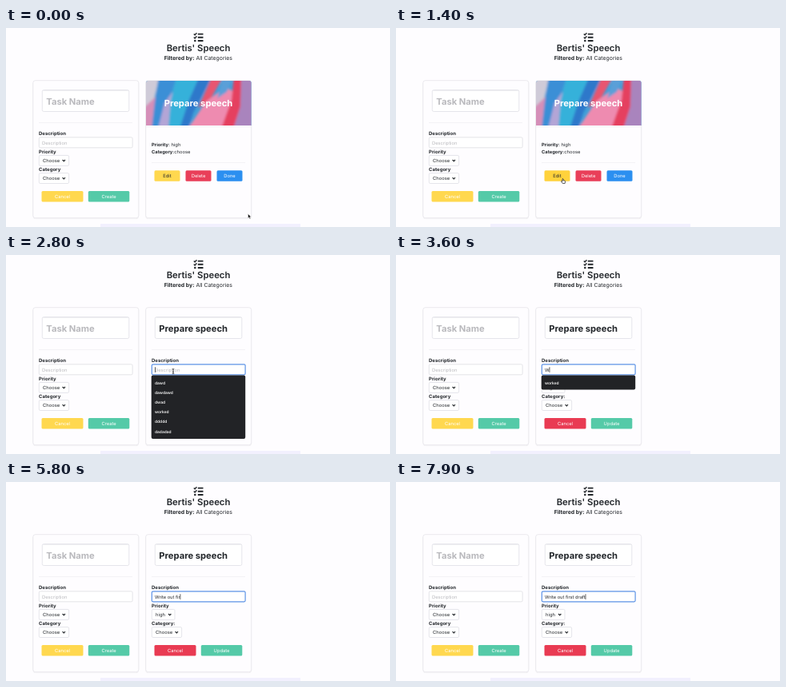
Recreate the animation shown at these times as an HTML page. Size 480 by 249 pixels, loop 8000 ms.

```html
<!DOCTYPE html>
<html lang="en">
<head>
<meta charset="utf-8">
<title>Task board</title>
<style>
  html, body { margin: 0; width: 100%; height: 100%; overflow: hidden; background: #fefdff; }
  svg { display: block; width: 100vw; height: 100vh; }
  text { font: 5.8px Inter, "Liberation Sans", sans-serif; fill: #23272b; white-space: pre; text-rendering: geometricPrecision; }
  .bold { font-weight: 700; }
  .label { font-size: 6px; font-weight: 700; }
  .big { font-size: 11.2px; font-weight: 700; }
  .mid { text-anchor: middle; }
  .white { fill: #fff; }
  .hint { fill: #b9b9bd; }
  .item { font-size: 4.9px; font-weight: 600; fill: #f4f4f4; }
</style>
</head>
<body>
<svg id="stage" viewBox="0 0 480 249">
  <defs>
    <filter id="soft" x="-20%" y="-20%" width="140%" height="140%"><feGaussianBlur stdDeviation="1.5"/></filter>
    <filter id="shade" x="-10%" y="-10%" width="120%" height="120%">
      <feDropShadow dx="0" dy=".6" stdDeviation=".7" flood-color="#000" flood-opacity=".1"/>
    </filter>
    <clipPath id="banner"><path d="M175 122V68.500q0-2.500 2.500-2.500H304q2.500 0 2.500 2.500V122z"/></clipPath>
  </defs>
  <rect width="480" height="249" fill="#fefdff"/>
  <rect x="118" y="245" width="250" height="4" fill="#f2f0fe"/>
  <g stroke="#23272b" fill="none" transform="translate(0 .3)">
    <path d="M239.800 7.300h6.700M239.800 11.500h6.700M239.800 15.700h6.700" stroke-width="1.900"/>
    <path d="M234.800 7.200l1.300 1.300 2.300-2.600M234.800 11.300l1.300 1.300 2.300-2.600" stroke-width="1.400"/>
    <circle cx="236.300" cy="15.700" r="1.300" fill="#23272b" stroke="none"/>
  </g>
  <text class="mid" x="240.500" y="29" style="font-size:11.300px;font-weight:600">Bertis' Speech</text>
  <text class="mid" x="240.300" y="40" style="font-size:6.900px"><tspan class="bold">Filtered by:</tspan> All Categories</text>
  <g id="cards"></g>
  <g id="create"></g>
  <g id="view"></g>
  <g id="edit"></g>
  <g id="menu"></g>
  <g id="arrow"><path d="M0 0v5.600l1.300-1.200 1 2.100.9-.4-1-2h1.800z" fill="#111" stroke="#fff" stroke-width=".5"/></g>
  <g id="hand"><path d="M-.6-2.200q.6-.7 1.100.2v1.700l2 .5q.7.300.5 1.200l-.4 2h-2.900l-1.700-2.200q-.1-.9.900-.5l.5.4z" fill="#fff" stroke="#111" stroke-width=".7"/></g>
  <g id="beam"><path d="M-1.300-3q1.300 0 1.300.8q0-.8 1.300-.8M0-2.300v4.800M-1.300 3.200q1.300 0 1.300-.8q0 .8 1.300.8M-.8.900h1.600" fill="none" stroke="#222" stroke-width=".7"/></g>
</svg>
<script>
const $ = id => document.getElementById(id);
const LOOP = 8000, STEP = 100;

const rect = (x, y, w, h, fill, stroke = "none", r = 1.5, extra = "") =>
  `<rect x="${x}" y="${y}" width="${w}" height="${h}" rx="${r}" fill="${fill}" stroke="${stroke}" stroke-width=".7" ${extra}/>`;
const text = (x, y, s, cls = "", id = "") =>
  `<text x="${x}" y="${y}" class="${cls}" ${id && `id="${id}"`}>${s}</text>`;
const button = (x, y, w, s, fill, cls = "white", id = "") =>
  rect(x, y, w, 13.5, fill, "none", 1.5, id && `id="${id}"`) + text(x + w / 2, y + 8.9, s, "mid " + cls);
const rule = (x, y) => `<path d="M${x} ${y}h117" stroke="#efeef2" stroke-width=".7"/>`;
const select = (x, y, w, s, id = "") =>
  rect(x, y, w, 13, "#fff", "#dcdce2", 1.5, id && `id="${id}"`) + text(x + 4.800, y + 8.700, s) +
  `<path d="M${x + w - 8} ${y + 5.6}l1.700 1.700 1.700-1.700" fill="none" stroke="#23272b" stroke-width="1.200"/>`;

// Form contents shared by both cards; x is the left edge of the fields.
const form = (x, title, titleClass, pick, pickWidth, catLabel, left, right, field, pickId) =>
  rect(x + 4.3, 77.5, 108.5, 27, "#fff", "#dcdce2", 2) +
  `<path d="M${x + 5} 78.500h107" stroke="#efeff2" stroke-width="1"/>` +
  text(x + 9.300, 95.800, title, "big " + titleClass) + rule(x, 118.500) +
  text(x, 134.400, "Description", "label") +
  rect(x + .3, 136.800, 116.800, 13, "#fff", "#d8d8de", 1.5, field && `id="${field}"`) +
  text(x + 4, 145.500, "Description", "hint", field && "hint") +
  text(x, 157, "Priority", "label") + select(x + .3, 159.400, pickWidth, pick, pickId) +
  text(x, 179.300, catLabel, "label") + select(x + .3, 181.500, 37.300, "Choose") +
  button(x + 3.500, 204, 52, "Cancel", left) + button(x + 61.800, 204, 51.500, right, "#55caa8");

const paint = (d, fill) => `<path d="${d}" fill="${fill}"/>`;
const picture = `<g clip-path="url(#banner)"><rect x="175" y="66" width="132" height="56" fill="#3f9fd8"/><g filter="url(#soft)">` +
  paint("M170 60h22l-7 30-15 14z", "#cfcbd8") +
  paint("M170 102l17-16 7 42h-24z", "#d58fb8") +
  paint("M191 60h22l-11 36-12 30h-8l4-34z", "#3a8fd6") +
  paint("M198 94l10-14-2 46h-16z", "#b3a5d6") +
  paint("M214 60h32l-16 36-12 30h-15l3-36z", "#35b1da") +
  paint("M242 60h16l-24 46-6 20h-11l11-34z", "#2f78ca") +
  paint("M258 60h14l-18 32-14 8z", "#e8556f") +
  paint("M250 92l24-18 12 6-14 48h-46z", "#ee8bb0") +
  paint("M272 60h13l-9 20-12 8z", "#5a9fd8") +
  paint("M285 60h10l-2 46-8 20h-16l13-36z", "#e5405e") +
  paint("M294 60h18v66h-28l9-28z", "#a984bd") + `</g></g>`;

$("cards").innerHTML = [33.8, 174.700].map(x => rect(x, 65.700, 132, 172, "#fefdff", "#e4e3e9", 3, 'filter="url(#shade)"')).join("");
$("create").innerHTML = form(41, "Task Name", "hint", "Choose", 37.300, "Category", "#ffd84f", "Create", "", "");
$("view").innerHTML = picture + text(240.500, 98, "Prepare speech", "big mid white") +
  `<path d="M175 123.500h131.500" stroke="#eeedf1" stroke-width=".7"/>` +
  text(182, 148.400, '<tspan class="bold">Priority:</tspan> high') +
  text(182, 157.300, '<tspan class="bold">Category:</tspan>choose') + rule(182, 168.500) +
  button(185.500, 178.300, 32, "Edit", "#ffd84f", "", "editButton") +
  button(224.500, 178.300, 32, "Delete", "#e93f59") + button(263.500, 178.300, 32, "Done", "#2b8ff0");
$("edit").innerHTML = form(182, "Prepare speech", "", "high", 28.700, "Category:", "#e93b53", "Update", "field", "pick") +
  text(186, 145.500, "", "", "typed") + rect(186, 140.200, .7, 6.700, "#222", "none", 0, 'id="caret"');
$("typed").style.fontSize = "5.7px";

const words = ["dawd", "dawdawd", "dwad", "worked", "ddddd", "dadadad"];
const menus = {
  all: rect(181.700, 150.600, 117.500, 79.400, "#222326", "none", 2) + words.map((w, i) => text(186, 161.500 + 12.200 * i, w, "item")).join(""),
  one: rect(181.700, 150.600, 117.500, 17.800, "#222326", "none", 2) + text(186, 161.500, "worked", "item")
};

const OPEN = 1600, FOCUS = 2800;
const phrase = "Write out first draft";
const keys = [3500, 3800, 4000, 4100, 4300, 4400, 4600, 4800, 5000, 5200, 5400,
  5600, 5800, 6000, 6200, 6400, 6600, 7000, 7400, 7800, 7900];
const path = [[0, 302.500, 232.500], [1000, 208.600, 191], [1800, 208.600, 191], [2200, 205.500, 165], [2400, 205.500, 165], [2700, 209, 145.500]];

function pointer(t) {
  const i = path.findIndex(p => p[0] > t);
  if (i < 0) return path[path.length - 1].slice(1);
  const [t0, x0, y0] = path[i - 1], [t1, x1, y1] = path[i];
  const u = (t - t0) / (t1 - t0), e = u * u * (3 - 2 * u);
  return [x0 + (x1 - x0) * e, y0 + (y1 - y0) * e];
}

const show = (id, on) => $(id).style.display = on ? "" : "none";
const inside = (v, a, b) => v >= a && v <= b;
let menuNow = "";

function draw(t) {
  const [x, y] = pointer(t);
  const editing = t >= OPEN, focused = t >= FOCUS;
  const typed = phrase.slice(0, keys.filter(k => k <= t).length);
  const onEdit = !editing && inside(x, 185, 218) && inside(y, 178, 193);
  const onButton = !editing && inside(x, 185, 296) && inside(y, 178, 193) && (x < 218 || inside(x, 224, 257) || x > 263);
  const onPick = editing && inside(y, 159, 173);
  const onSelect = onPick || editing && inside(y, 181, 189);
  const kind = typed ? "" : editing && y < 151 ? "beam" : onButton || onSelect ? "hand" : "arrow";

  show("view", !editing);
  show("edit", editing);
  for (const id of ["arrow", "hand", "beam"]) {
    show(id, id === kind);
    $(id).setAttribute("transform", `translate(${x} ${y})`);
  }
  $("editButton").setAttribute("fill", onEdit ? "#ffd23c" : "#ffd84f");
  $("pick").setAttribute("stroke", onPick ? "#a6a7ad" : "#dcdce2");
  $("field").setAttribute("stroke", focused ? "#5d93e6" : "#d8d8de");
  $("field").setAttribute("stroke-width", focused ? 1.2 : .7);
  show("hint", !typed);
  $("typed").textContent = typed;
  show("caret", focused);
  if (focused) $("caret").setAttribute("x", 186 + (typed ? $("typed").getComputedTextLength() : 0));

  const menu = !focused || typed.length > 1 ? "" : typed ? "one" : "all";
  if (menu !== menuNow) $("menu").innerHTML = menus[menu] || "";
  menuNow = menu;
}

const start = performance.now();
function tick() {
  const t = (performance.now() - start) % LOOP;
  draw(Math.floor(t / STEP) * STEP);
  requestAnimationFrame(tick);
}
tick();
</script>
</body>
</html>
```
